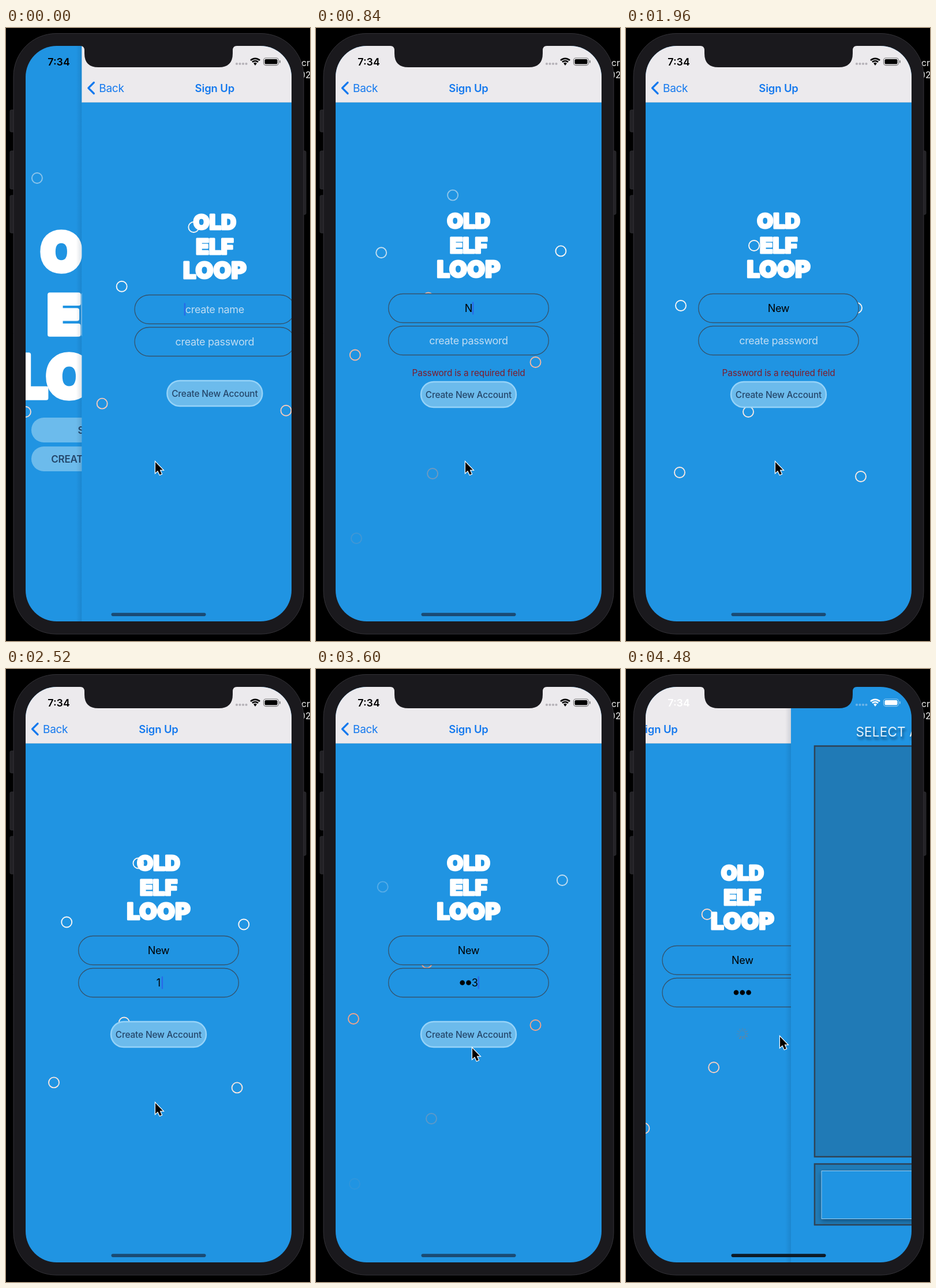
These frames come from a looping animation (527 by 1062 pixels, 4.52 s). An HTML page with a canvas:

```html
<!DOCTYPE html>
<html lang="en">
<head>
<meta charset="utf-8">
<title>Sign up flow</title>
<style>
html, body { margin: 0; width: 100%; height: 100%; overflow: hidden; background: #000; }
canvas { display: block; }
</style>
</head>
<body>
<canvas id="stage" width="527" height="1062"></canvas>
<script>
const ctx = document.getElementById('stage').getContext('2d');
const LOOP = 4520, STEP = 40;
const LEFT = 34, TOP = 31, WIDTH = 461, HEIGHT = 997, MID = 264.5;
const BLUE = '#2094e2', PALE = '#6cbbec', LINK = '#1479ee', BAR = '#eceaed', INK = '#24466a';
const PUSH_IN = -0.16, PUSH_OUT = 4.396;
const clamp = v => Math.max(0, Math.min(1, v));

// Drifting ring lanes: [age, x, y] with the ages where a ring appears and vanishes.
const lanes = [
  { from: -2.45, to: 3.77, path: [[-2.4, 67, 892], [-1.94, 89, 833], [-1.22, 93, 770], [-.1, 71, 661],
    [.43, 65, 605], [1.24, 74, 532], [1.96, 95, 481], [2.84, 110, 414], [3.08, 112, 396], [3.64, 116, 376]] },
  { from: -2.6, to: 3.6, path: [[-2.4, 200, 779], [-1.94, 215, 726], [-1.22, 212, 665], [.43, 192, 508],
    [1.24, 202, 430], [1.96, 222, 377], [2.4, 228, 345], [2.84, 233, 314], [3.08, 236, 298], [3.6, 239, 272]] },
  { from: -2.2, to: 4.12, path: [[-2.2, 378, 878], [-1.94, 392, 847], [-1.22, 407, 777], [-.1, 390, 673],
    [.43, 380.5, 616], [1.24, 384, 545], [1.96, 400, 485], [2.84, 419, 418], [3.08, 423, 397], [3.62, 427, 365], [4.12, 430, 348]] }
];
const births = [-2.4, 0, 3.18, 6];
const tint = [[-2.6, 0], [-1.94, 0], [-1.2, .85], [-.1, .55], [.44, 0], [1.24, .6], [1.96, 1], [4.2, 1]];

// Smooth curve through timed points; each point is [time, value...].
function track(points, time, k = 1) {
  const last = points.length - 1;
  let i = 0;
  while (i < last - 1 && time > points[i + 1][0]) i++;
  const slope = j => {
    const a = points[Math.max(0, j - 1)], b = points[Math.min(last, j + 1)];
    return (b[k] - a[k]) / (b[0] - a[0]);
  };
  const [p, q] = [points[i], points[i + 1]], span = q[0] - p[0];
  const u = clamp((time - p[0]) / span), v = 1 - u;
  return v * v * (1 + 2 * u) * p[k] + u * u * (3 - 2 * u) * q[k]
    + span * u * v * (v * slope(i) - u * slope(i + 1));
}

// Fraction of a page push still to travel.
function remaining(t, start) {
  const x = Math.max(0, t - start) * 18.26;
  return (1 + x) * Math.exp(-x);
}

function box(x, y, w, h, r, fill, stroke, line = 1) {
  ctx.beginPath();
  ctx.roundRect(x, y, w, h, r);
  if (fill) { ctx.fillStyle = fill; ctx.fill(); }
  if (stroke) { ctx.strokeStyle = stroke; ctx.lineWidth = line; ctx.stroke(); }
}

// y is the middle of the capital letters; returns the text width.
function text(str, x, y, size, color, { weight = 400, align = 'center', spacing = 0 } = {}) {
  ctx.font = `${weight} ${size}px Inter, Roboto, sans-serif`;
  ctx.letterSpacing = spacing + 'px';
  ctx.textAlign = align;
  ctx.fillStyle = color;
  ctx.fillText(str, x, y + size * .36);
  return ctx.measureText(str).width;
}

function dot(x, y, r, color) {
  ctx.fillStyle = color;
  ctx.beginPath();
  ctx.arc(x, y, r, 0, 7);
  ctx.fill();
}

function ring(x, y, alpha, white) {
  const mix = (a, b) => a + (b - a) * white;
  ctx.globalAlpha = clamp(alpha);
  ctx.strokeStyle = `rgb(${mix(240, 250)},${mix(164, 246)},${mix(138, 244)})`;
  ctx.lineWidth = 1.9;
  ctx.beginPath();
  ctx.arc(x, y, 9, 0, 7);
  ctx.stroke();
  ctx.globalAlpha = 1;
}

function shifted(x, y, draw) {
  ctx.save();
  ctx.translate(x, y);
  draw();
  ctx.restore();
}

function title(y, scale) {
  shifted(MID, y, () => {
    ctx.scale(scale, scale);
    ctx.strokeStyle = '#fff';
    ctx.lineWidth = 3;
    ctx.lineJoin = 'round';
    [['OLD', 0, 36], ['ELF', 42.3, 37], ['LOOP', 84, 40]].forEach(([word, dy, size]) => {
      text(word, 0, dy, size, '#fff', { weight: 900 });
      ctx.strokeText(word, 0, dy + size * .36);
    });
  });
}

function edgeShadow() {
  const g = ctx.createLinearGradient(LEFT - 10, 0, LEFT, 0);
  g.addColorStop(0, 'rgba(0,30,60,0)');
  g.addColorStop(1, 'rgba(0,30,60,.12)');
  ctx.fillStyle = g;
  ctx.fillRect(LEFT - 10, TOP, 10, HEIGHT);
}

function page() {
  ctx.fillStyle = BLUE;
  ctx.fillRect(LEFT, TOP, WIDTH, HEIGHT);
}

function welcome(t) {
  page();
  ring(163, 260 - t * 60, .5 - t, 1);
  ring(143, 665 - t * 100, 1, .7);
  title(388, 2.57);
  [['SIGN IN', 675], ['CREATE ACCOUNT', 725]].forEach(([label, y]) => {
    box(153, y, 222, 43, 21.5, PALE);
    text(label, MID, y + 21.5, 17, INK, { weight: 600, spacing: -.2 });
  });
}

function caret(x, y, visible) {
  if (visible) box(x - 1.2, y - 11, 2.4, 22, 1, '#2a6ae8');
}

// Solid after each keystroke, then half a second off and on.
const blink = (t, keyTime) => (t - keyTime) % 1 < .55;

function nameField(t, y) {
  box(125.7, y - 25, 277.6, 50, 25, BLUE, '#34536d', 1.3);
  const keys = [.68, .86, 1.04], typed = keys.filter(k => t >= k).length;
  const w = typed
    ? text('New'.slice(0, typed), MID, y, 18, '#000', { spacing: -.3 })
    : text('create name', MID, y, 18, '#bfdcf2', { spacing: -.35 });
  caret(MID + (typed ? w / 2 + 1 : -w / 2 - 1), y, t < 2.2 && blink(t, typed ? keys[typed - 1] : 0));
}

function passwordField(t, y) {
  box(125.7, y - 25, 277.6, 50, 25, BLUE, '#34536d', 1.3);
  const keys = [2.52, 2.92, 3.4], typed = keys.filter(k => t >= k).length;
  const focused = t >= 2.2 && t < 3.96, cell = 10.8;
  if (!typed) {
    const w = text('create password', MID, y, 18, '#bfdcf2', { spacing: -.35 });
    caret(MID - w / 2 - 1, y, focused);
    return;
  }
  const start = MID - typed * cell / 2;
  for (let i = 0; i < typed; i++) {
    const x = start + (i + .5) * cell;
    if (i === typed - 1 && focused) text(i + 1, x, y, 18, '#000');
    else dot(x, y, 4.3, '#000');
  }
  caret(start + typed * cell + 1, y, focused && blink(t, keys[typed - 1]));
}

function spinner(t) {
  const step = Math.floor(t * 12);
  ctx.lineWidth = 1.6;
  ctx.lineCap = 'round';
  for (let i = 0; i < 12; i++) {
    const a = i * Math.PI / 6, c = Math.cos(a), s = Math.sin(a);
    ctx.strokeStyle = `rgba(115,130,145,${.3 + .6 * ((i - step % 12 + 12) % 12) / 12})`;
    ctx.beginPath();
    ctx.moveTo(MID + 5 * c, 632 + 5 * s);
    ctx.lineTo(MID + 9.5 * c, 632 + 9.5 * s);
    ctx.stroke();
  }
}

function signUp(t, barShift) {
  const error = t >= .68 && t < 2.52;
  const dy = t >= PUSH_OUT ? 17 : error ? -2 : 0;
  page();
  for (const { from, to, path } of lanes) {
    for (const birth of births) {
      const age = t - birth;
      if (age > from && age < to) {
        ring(track(path, age, 1), track(path, age, 2),
          Math.min((age - from) / .7, (to - age) / .7), clamp(track(tint, age)));
      }
    }
  }
  title(336 + dy, 1);
  nameField(t, 487.5 + dy);
  passwordField(t, 543.5 + dy);
  if (error) text('Password is a required field', MID, 597, 15.3, '#7d1c2c', { spacing: -.15 });
  if (t < 3.96) {
    const y = error ? 635 : 633;
    box(182, y - 22, 165, 44, 22, PALE, '#96d3f8', 2.4);
    text('Create New Account', MID, y, 15.4, INK, { weight: 500, spacing: -.15 });
  } else spinner(t);

  ctx.fillStyle = BAR;
  ctx.fillRect(LEFT, TOP, WIDTH, 98);
  ctx.fillStyle = '#b9c4d0';
  ctx.fillRect(LEFT, 128.5, WIDTH, .6);
  shifted(barShift, 0, () => {
    ctx.strokeStyle = LINK;
    ctx.lineWidth = 3.2;
    ctx.lineCap = ctx.lineJoin = 'round';
    ctx.stroke(new Path2D('M55 94.5L45.500 104L55 113.500'));
    text('Back', 64, 104, 19, LINK, { align: 'left', spacing: -.3 });
    text('Sign Up', MID, 104, 18.4, LINK, { weight: 600, spacing: -.1 });
  });
}

function select() {
  page();
  ctx.save();
  ctx.shadowColor = 'rgba(0,30,60,.65)';
  ctx.shadowBlur = 4;
  ctx.shadowOffsetX = 2;
  ctx.shadowOffsetY = 5;
  text('SELECT A CHANNEL', 146.5, 109, 22.5, '#e8f4fc', { align: 'left', spacing: .2 });
  ctx.restore();
  box(75, 133.5, 379, 711.5, 0, '#207ab6', '#2f4356', 2.5);
  box(75, 857.5, 379, 105.5, 0, '#207ab6', '#2f4356', 2.5);
  ctx.save();
  ctx.shadowColor = 'rgba(0,30,60,.5)';
  ctx.shadowBlur = 8;
  ctx.shadowOffsetY = 3;
  box(87, 869.5, 355, 83, 0, BLUE);
  ctx.restore();
  box(87, 869.5, 355, 83, 0, null, '#9bcdee', 1);
}

function statusBar(color, dots) {
  text('7:34', 91.500, 58.5, 17.8, color, { weight: 600 });
  for (let i = 0; i < 4; i++) dot(400 + i * 5.5, 62, 2.1, dots);
  ctx.strokeStyle = color;
  ctx.lineCap = 'butt';
  ctx.lineWidth = 2.7;
  [7, 11.2].forEach(r => {
    ctx.beginPath();
    ctx.arc(432, 64, r, -2.36, -.78);
    ctx.stroke();
  });
  ctx.fillStyle = color;
  ctx.beginPath();
  ctx.moveTo(432, 65);
  ctx.arc(432, 64, 4, -2.36, -.78);
  ctx.fill();
  ctx.globalAlpha = .5;
  box(446.5, 52, 26, 12.6, 4, null, color, 1.1);
  box(474, 56, 1.7, 4.6, 1, color);
  ctx.globalAlpha = 1;
  box(448.5, 54, 22, 8.6, 2.2, color);
}

function phoneBody() {
  text('Scr', 502, 60, 15.5, '#d4d4d4', { weight: 500, align: 'left' });
  text('02', 509, 81, 15.5, '#d4d4d4', { weight: 500, align: 'left' });
  [[7, 142, 38], [7, 213, 66], [7, 290, 65], [512, 213, 110]]
    .forEach(([x, y, h]) => box(x, y, 8, h, 2, '#222125', '#2d2c30'));
  box(13, 9.5, 503, 1040.5, 74, '#1a191d', '#343338', 1);
}

function notch() {
  ctx.fillStyle = '#1a191d';
  ctx.fill(new Path2D('M129 30H400V31Q393 31 393 39V44Q393 68 369 68H160Q136 68 136 44V39Q136 31 129 31Z'));
}

function pointer(t) {
  const moves = [[3.28, 259, 752], [3.6, 271, 657], [3.8, 267, 637]];
  const i = t < 3.6 ? 0 : 1, [a, b] = [moves[i], moves[i + 1]];
  const u = clamp((t - a[0]) / (b[0] - a[0])), ease = u * u * (3 - 2 * u);
  shifted(a[1] + (b[1] - a[1]) * ease, a[2] + (b[2] - a[2]) * ease, () => {
    const arrow = new Path2D('M0 0V18.500L4.200 14.700L7.600 22L10.800 20.600L7.600 13.500H13Z');
    ctx.lineJoin = 'miter';
    ctx.strokeStyle = '#fff';
    ctx.lineWidth = 2.4;
    ctx.stroke(arrow);
    ctx.fillStyle = '#000';
    ctx.fill(arrow);
  });
}

function draw(now) {
  const t = Math.floor((now % LOOP) / STEP) * STEP / 1000;
  const arriving = remaining(t, PUSH_IN), leaving = 1 - remaining(t, PUSH_OUT);
  const light = t >= PUSH_OUT;

  ctx.fillStyle = '#000';
  ctx.fillRect(0, 0, 527, 1062);
  phoneBody();

  ctx.save();
  ctx.beginPath();
  ctx.roundRect(LEFT, TOP, WIDTH, HEIGHT, 54);
  ctx.clip();
  if (t < .5) shifted(-.3 * WIDTH * (1 - arriving), 0, () => welcome(t));
  shifted(WIDTH * arriving - .3 * WIDTH * leaving, 0, () => {
    if (t < .5) edgeShadow();
    signUp(t, -.7 * WIDTH * leaving);
  });
  if (light) shifted(WIDTH * (1 - leaving), 0, () => { edgeShadow(); select(); });
  statusBar(light ? '#fff' : '#000', light ? '#6db4e8' : '#b5b2b8');
  box(182.5, 1013.3, 164, 5.6, 2.8, light ? '#0d1a26' : '#1a4b74');
  ctx.restore();

  notch();
  pointer(t);
  requestAnimationFrame(draw);
}
requestAnimationFrame(draw);
</script>
</body>
</html>
```
